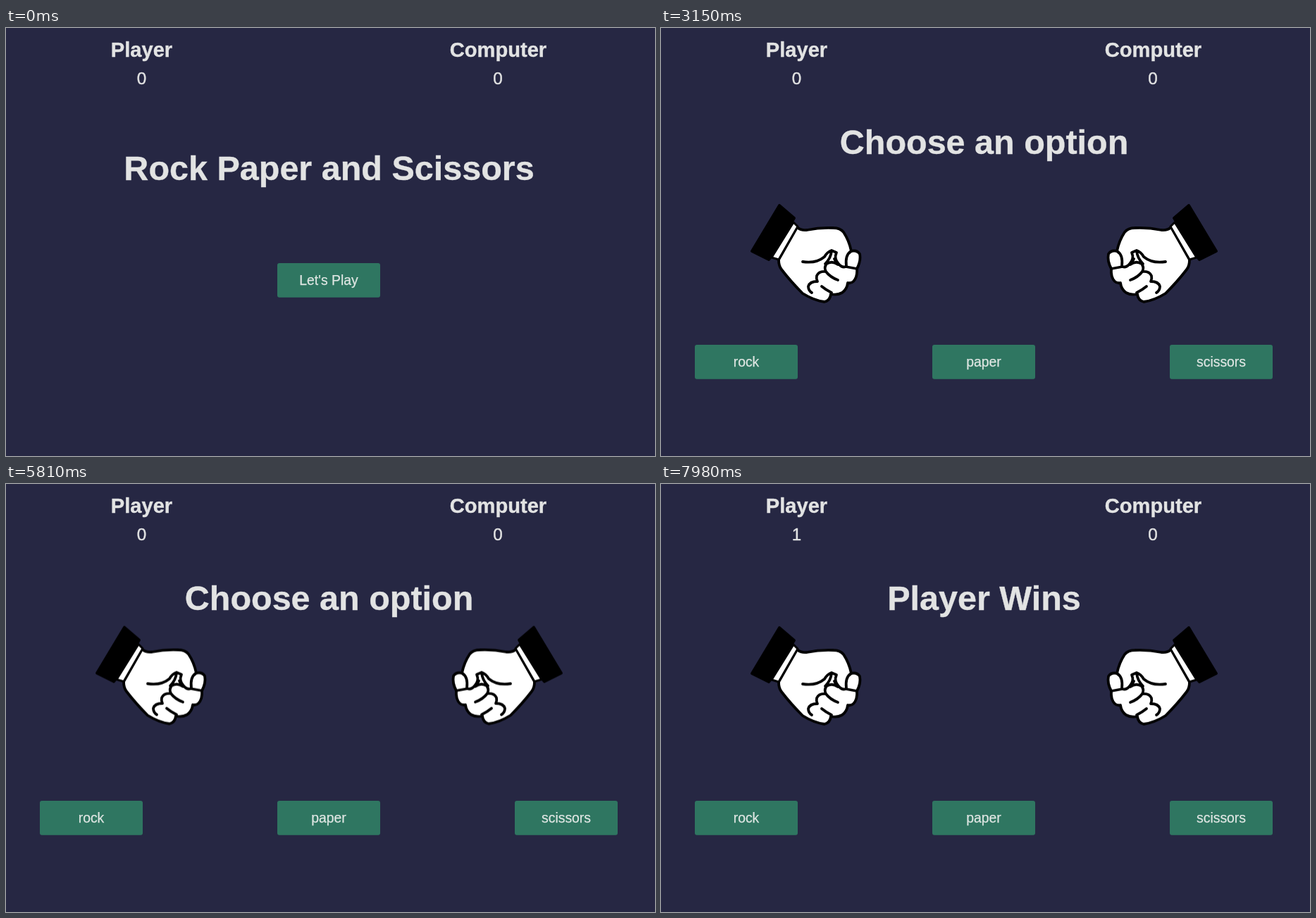
An HTML page for the animation above (8 s loop, 921 by 608 pixels).

```html
<!DOCTYPE html>
<html lang="en">
<head>
<meta charset="utf-8">
<title>Rock Paper and Scissors</title>
<style>
  html, body { margin: 0; width: 100%; height: 100%; overflow: hidden; background: #262743; }
  svg { display: block; width: 921px; height: 608px; }
  text { font-family: "Liberation Sans", Arial, sans-serif; fill: #e2e3e3; stroke: #e2e3e3; stroke-width: .4; text-anchor: middle; }
  .title { font-size: 48.5px; font-weight: bold; }
  .name { font-size: 29.1px; font-weight: bold; }
  .score { font-size: 24.25px; }
  .button text { font-size: 19.4px; fill: #dfe6e3; stroke: #dfe6e3; stroke-width: .25; }
  .button rect { fill: #2f7661; }
  .ink { fill: none; stroke: #000; stroke-width: 3.8; stroke-linecap: round; stroke-linejoin: round; }
  .skin { fill: #fff; }
</style>
</head>
<body>
<svg viewBox="0 0 921 608">
  <defs>
    <g id="sleeve" class="ink">
      <path class="skin" stroke-width="3" d="M188 276L194 282L167 329L157 326Z"/>
      <path fill="#000" d="M168 252L189 270L185 277L157 324L153 329L129 317Z"/>
    </g>
    <g id="rock" class="ink">
      <path class="skin" d="M193 283Q199 288 207 287Q226 283 245 284Q254 284 259 290Q267 302 270 317
        Q278 315 282 321Q284 331 278 342Q279 354 273 360Q270 363 265 362Q264 371 257 376
        Q250 380 241 378Q240 387 232 389Q217 387 201 377Q184 360 171 343Q167 338 167 329Z"/>
      <path d="M201 332Q220 335 232 325Q236 318 242 316L249 319Q245 328 252 335Q257 341 262 339L278 342
        M270 317Q261 322 263 338
        M242 317Q241 327 233 335M246 328L250 335
        M251 336Q243 330 235 335Q231 340 234 346
        M234 346Q224 345 221 352Q220 356 222 360M234 346Q240 354 251 358
        M222 360Q211 360 209 367Q209 373 214 376M228 367Q234 372 242 376"/>
    </g>
    <g id="paper" class="ink">
      <path class="skin" d="M193 283Q200 287 211 287Q235 286 254 283Q263 283 269 288Q277 297 281 304L294 314
        Q314 335 327 364Q328 373 320 374Q323 389 315 392Q309 393 305 388Q305 395 296 395Q290 395 285 390
        Q281 396 273 391Q258 379 244 368Q235 364 219 361Q198 355 183 341Q175 332 167 329Z"/>
      <path d="M225 326Q242 328 249 319Q253 310 262 312Q276 324 286 325Q294 323 293 314
        M284 335Q296 341 305 350Q314 361 320 374
        M268 347Q280 352 290 363L305 388
        M257 360Q269 364 276 374L285 390
        M206 313Q194 318 193 331"/>
    </g>
  </defs>
  <rect width="921" height="608" fill="#262743"/>
  <text class="name" x="192.5" y="41">Player</text>
  <text class="name" x="698.5" y="41">Computer</text>
  <text class="score" id="playerScore" x="192.5" y="80">0</text>
  <text class="score" x="698" y="80">0</text>
  <g id="intro">
    <text class="title" x="458.5" y="216">Rock Paper and Scissors</text>
    <g class="button" transform="translate(385 334)">
      <rect width="146" height="48.7" rx="3"/><text x="73" y="31">Let's Play</text>
    </g>
  </g>
  <g id="match">
    <text class="title" id="status" x="458.5" y="179"></text>
    <g id="hands">
      <use id="playerHand" href="#rock"/><use href="#sleeve"/>
      <g transform="matrix(-1 0 0 1 917 0)"><use href="#rock"/><use href="#sleeve"/></g>
    </g>
    <g class="button" transform="translate(48 450)">
      <rect width="146" height="48.7" rx="3"/><text x="73" y="31">rock</text>
    </g>
    <g class="button" transform="translate(385 450)">
      <rect width="146" height="48.7" rx="3"/><text x="73" y="31">paper</text>
    </g>
    <g class="button" transform="translate(722 450)">
      <rect width="146" height="48.7" rx="3"/><text x="73" y="31">scissors</text>
    </g>
  </g>
</svg>
<script>
const LOOP = 8000, STEP = 70;
const FADE_START = 2055, FADE = 525;
const SHAKE = 2100, LIFT = 48.5, FIRST = 4463, SECOND = 7660;
const RESULT = FIRST + SHAKE, RESET = 7630;
const STOPS = [0, .15, .25, .35, .5, .65, .75, .85, 1];
const el = id => document.getElementById(id);
const clamp = x => Math.min(1, Math.max(0, x));

// CSS "ease": cubic-bezier(.25, .1, .25, 1)
function ease(x) {
  if (x <= 0 || x >= 1) return clamp(x);
  const bezier = (a, b, u) => 3 * a * u * (1 - u) ** 2 + 3 * b * u * u * (1 - u) + u ** 3;
  let low = 0, high = 1;
  for (let i = 0; i < 24; i++) {
    const mid = (low + high) / 2;
    if (bezier(.25, .25, mid) < x) low = mid; else high = mid;
  }
  return bezier(.1, 1, low);
}

// Hands alternate between rest and raised at each stop
function shake(p) {
  if (p <= 0 || p >= 1) return 0;
  const i = STOPS.findIndex(stop => stop > p) - 1;
  const e = ease((p - STOPS[i]) / (STOPS[i + 1] - STOPS[i]));
  return -LIFT * (i % 2 ? 1 - e : e);
}

function draw(t) {
  const won = t >= RESULT;
  el("intro").setAttribute("opacity", 1 - ease((t - FADE_START) / FADE));
  el("match").setAttribute("opacity", ease((t - FADE_START - FADE) / FADE));
  el("status").textContent = won ? "Player Wins" : "Choose an option";
  el("playerScore").textContent = won ? 1 : 0;
  el("playerHand").setAttribute("href", won && t < RESET ? "#paper" : "#rock");
  const y = shake((t - (t < RESET ? FIRST : SECOND)) / SHAKE);
  el("hands").setAttribute("transform", `translate(0 ${y})`);
}

function tick() {
  const t = performance.now() % LOOP;
  draw(Math.floor(t / STEP) * STEP);
  requestAnimationFrame(tick);
}
tick();
</script>
</body>
</html>
```
